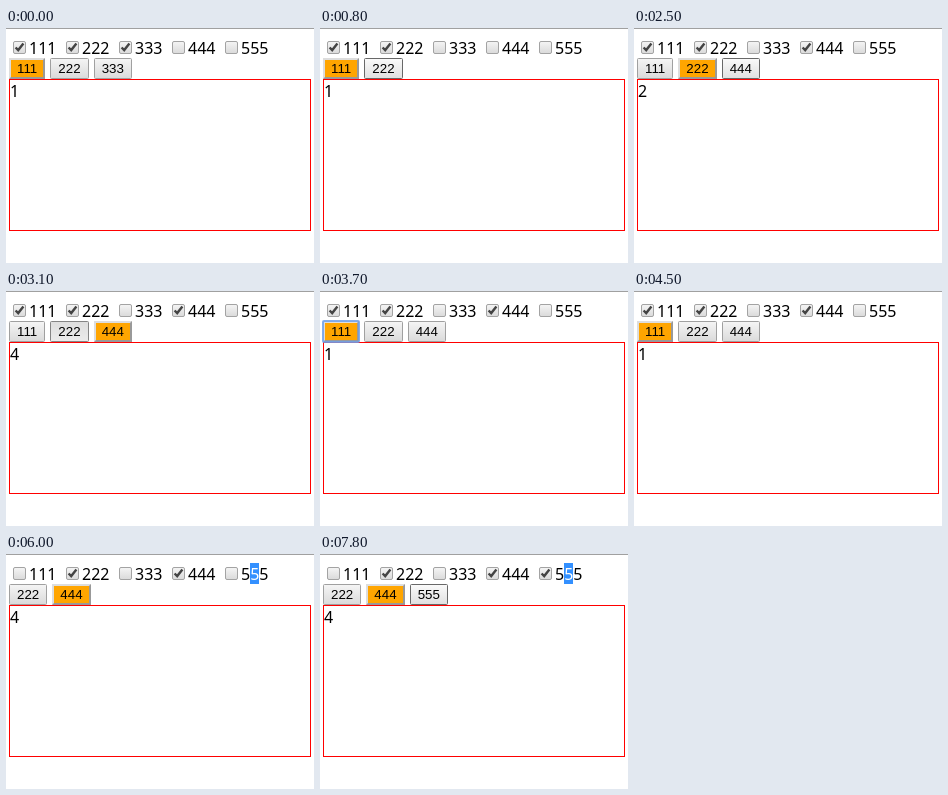
An HTML page that plays this animation: 308 by 235 pixels, repeating every 8 s.

```html
<!DOCTYPE html>
<html lang="en">
<head>
<meta charset="utf-8">
<title>Checkbox tabs</title>
<style>
  html, body { margin: 0; width: 100%; height: 100%; overflow: hidden; background: #fff; }
  svg { display: block; }
  text { font: 16px "Noto Sans", "Open Sans", sans-serif; }
  .label { font: 13.333px "Liberation Sans", Arial, sans-serif; text-anchor: middle; }
</style>
</head>
<body>
<svg id="stage" width="308" height="235" viewBox="0 0 308 235">
  <defs>
    <linearGradient id="face" x2="0" y2="1">
      <stop stop-color="#f5f5f5"/><stop offset="1" stop-color="#dadada"/>
    </linearGradient>
    <linearGradient id="hover" x2="0" y2="1">
      <stop stop-color="#fafafa"/><stop offset="1" stop-color="#e0e0e0"/>
    </linearGradient>
    <linearGradient id="pressed" x2="0" y2="1">
      <stop stop-color="#dedede"/><stop offset="1" stop-color="#ebebeb"/>
    </linearGradient>
  </defs>
  <path d="M0 .5H308" stroke="#a0a0a0"/>
  <rect x="3.5" y="51.5" width="301" height="151" fill="none" stroke="red"/>
  <g id="view"></g>
</svg>
<script>
const LOOP = 8000;

// Each entry changes part of the state from its time on.
const timeline = [
  [0, { checked: [1, 2, 3], active: 1, hover: 0, pressed: 0, focus: 0, selected: false }],
  [500, { checked: [1, 2] }],
  [800, { hover: 2 }],
  [1100, { pressed: 2 }],
  [1200, { active: 2, focus: 2, pressed: 0, hover: 0 }],
  [2100, { focus: 0 }],
  [2200, { checked: [1, 2, 4] }],
  [2500, { hover: 4 }],
  [2700, { pressed: 4 }],
  [2800, { active: 4, focus: 4, pressed: 0, hover: 0 }],
  [2900, { hover: 2 }],
  [3100, { pressed: 2, focus: 0 }],
  [3200, { active: 2, focus: 2, pressed: 0, hover: 0 }],
  [3500, { hover: 1 }],
  [3700, { active: 1, focus: 1, hover: 0 }],
  [3900, { hover: 2 }],
  [4000, { hover: 0 }],
  [4500, { focus: 0 }],
  [4600, { checked: [2, 4], active: 2 }],
  [4900, { hover: 4 }],
  [5100, { pressed: 4 }],
  [5200, { active: 4, focus: 4, pressed: 0, hover: 0 }],
  [6000, { focus: 0, selected: true }],
  [7000, { checked: [2, 4, 5] }],
  [7800, { hover: 5 }],
];

const name = n => String(n).repeat(3);

function checkbox(n, s) {
  const x = 7 + (n - 1) * 53;
  const mark = s.checked.includes(n)
    ? `<path d="M${x + 2.6} 19.5l2.6 2.6L${x + 10.4} 15.6" fill="none" stroke="#444" stroke-width="2.4"/>` : '';
  const selected = n === 5 && s.selected;
  const label = selected ? '5<tspan fill="#fff">5</tspan>5' : name(n);
  return `<rect x="${x + .5}" y="13.5" width="12" height="12" rx="1.5" fill="url(#face)" stroke="#a3a3a3"/>${mark}`
    + (selected ? '<rect x="244" y="9" width="9" height="21" fill="#3390ff"/>' : '')
    + `<text x="${x + 16}" y="26">${label}</text>`;
}

function button(n, left, width, s) {
  const x = Math.round(left), right = Math.round(left + width), w = right - x;
  let box;
  if (n === s.active) {
    box = `<rect x="${x}" y="30" width="${w}" height="21" fill="#ddd"/>
      <path d="M${right} 30V51H${x}l2-2L${right - 2} 32z" fill="#999"/>
      <rect x="${x + 2}" y="32" width="${w - 4}" height="17" fill="orange"/>`;
  } else {
    const mode = n === s.pressed ? 'pressed' : n === s.hover ? 'hover' : 'face';
    const stroke = { pressed: '#858585', hover: '#686868', face: '#a0a0a0' }[mode];
    box = `<rect x="${x + .5}" y="30.5" width="${w - 1}" height="20" rx="1" fill="url(#${mode})" stroke="${stroke}"/>`;
  }
  const ring = n === s.focus
    ? `<rect x="${x}" y="30" width="${w}" height="21" rx="1" fill="none" stroke="#6f9fe8" stroke-opacity=".85" stroke-width="2"/>` : '';
  return `${box}${ring}<text class="label" x="${left + width / 2}" y="45">${name(n)}</text>`;
}

function render(s) {
  let left = 3, out = [1, 2, 3, 4, 5].map(n => checkbox(n, s)).join('');
  for (const n of s.checked) {
    const width = n === 1 ? 36.25 : 38.25;
    out += button(n, left, width, s);
    left += width + 5.1;
  }
  return out + `<text x="4" y="69">${s.active}</text>`;
}

const view = document.getElementById('view');
let shown = -1;

function frame() {
  const t = performance.now() % LOOP;
  const past = timeline.filter(([time]) => time <= t);
  if (past.length !== shown) {
    shown = past.length;
    view.innerHTML = render(Object.assign({}, ...past.map(([, change]) => change)));
  }
  requestAnimationFrame(frame);
}
frame();
</script>
</body>
</html>
```
